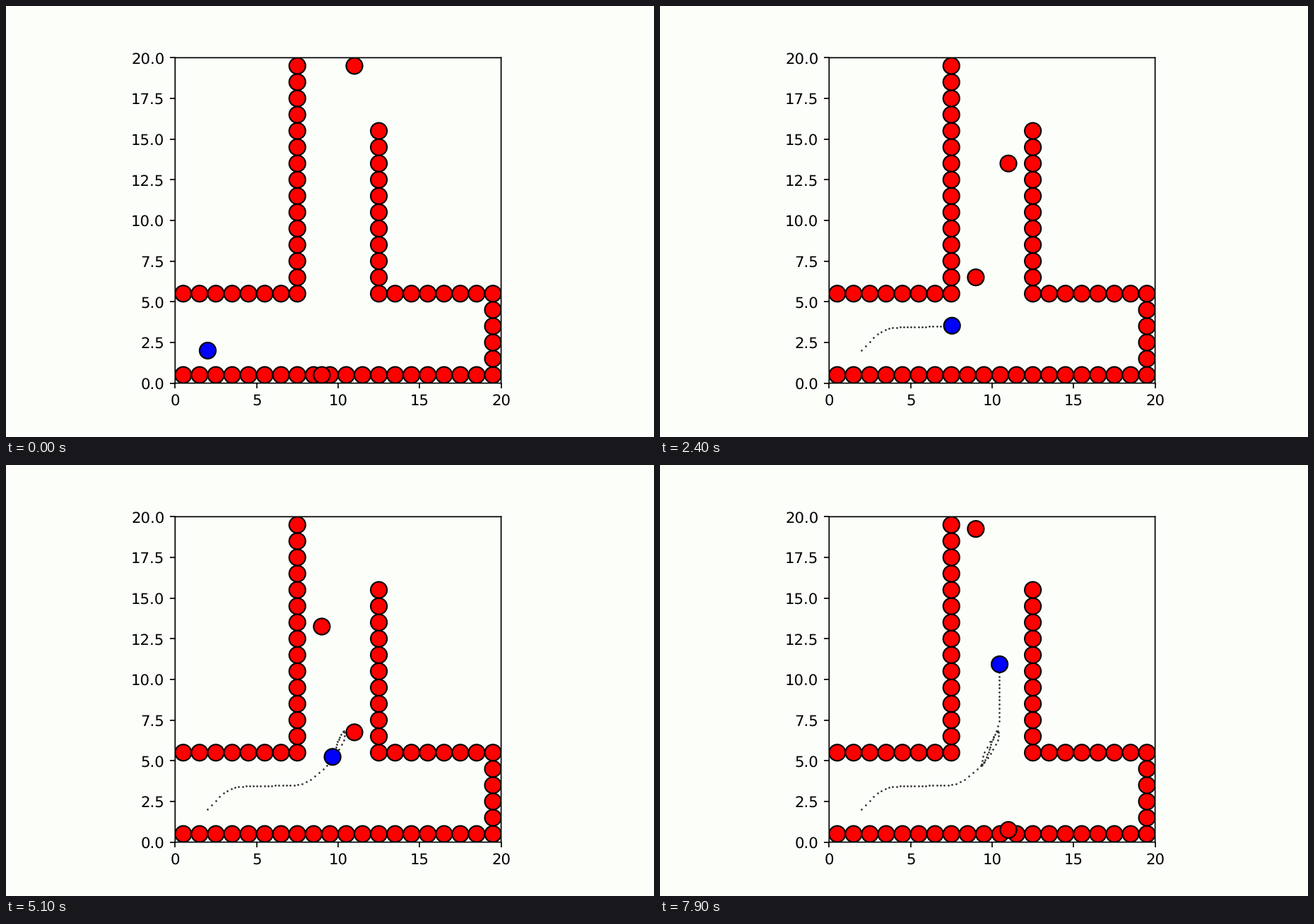
Write a matplotlib script that moves like this. It is 917 px wide and 611 px high and loops after 8000 ms.

```python
import matplotlib.pyplot as plt
import numpy as np
from matplotlib.animation import FuncAnimation
from matplotlib.patches import Circle

W, H, DPI = 917, 611, 128
U = 152.8 / DPI          # scale for point sizes
FRAMES, INTERVAL = 80, 100
PAPER, RED, BLUE = "#fcfefa", "#fe0000", "#0000fe"

# Robot's turning points: step, x, y
TURNS = np.array([
    (0, 2, 2), (4, 2.98, 3), (8, 3.9, 3.41), (24, 7.54, 3.53),
    (31, 9.32, 4.7), (35, 10.06, 5.71), (38, 10.4, 6.53), (40, 10.36, 6.85),
    (43, 10.09, 6.46), (51, 9.66, 5.24), (55, 9.36, 4.7), (58, 9.45, 5.29),
    (65, 10.42, 7.43), (79, 10.46, 10.93),
])


def glide(t, tk, p):
    """Cubic through the points p at times tk that never overshoots."""
    v = np.diff(p) / np.diff(tk)
    a, b = v[:-1], v[1:]
    same = a * b > 0
    mean = np.where(same, 2 * a * b / np.where(same, a + b, 1), 0)
    m = np.concatenate([v[:1], mean, v[-1:]])
    i = np.clip(np.searchsorted(tk, t, side="right") - 1, 0, len(tk) - 2)
    h = tk[i + 1] - tk[i]
    s = (t - tk[i]) / h
    return ((1 + 2 * s) * (1 - s) ** 2 * p[i] + s * (1 - s) ** 2 * h * m[i]
            + s * s * (3 - 2 * s) * p[i + 1] + s * s * (s - 1) * h * m[i + 1])


def travel(n, step=0.25, span=19.25):
    """Distance from the start of a body bouncing between two ends."""
    return span - abs(span - n * step)


steps = np.arange(FRAMES)
times, xs, ys = TURNS.T
path = np.column_stack([glide(steps, times, xs), glide(steps, times, ys)])

plt.rcParams.update({
    "font.family": "DejaVu Sans", "font.size": 10 * U,
    "text.hinting": "none", "path.snap": False,
    "axes.linewidth": 0.8 * U,
})

fig = plt.figure(figsize=(W / DPI, H / DPI), dpi=DPI, facecolor=PAPER)
ax = fig.add_axes([0.125, 0.125, 0.775, 0.755], facecolor=PAPER)
ax.set_aspect("equal")
ax.set(xlim=(0, 20), ylim=(0, 20))
ax.set_xticks(np.arange(0, 21, 5))
ax.set_yticks(np.arange(0, 20.1, 2.5))
ax.tick_params(length=3.5 * U, width=0.8 * U, pad=3.5 * U)


def disc(x, y, color, z=1):
    return ax.add_patch(Circle((x, y), 0.5, facecolor=color, edgecolor="black",
                               linewidth=U, zorder=z))


def wall(x, y):
    for cx, cy in np.broadcast(x, y):
        disc(cx, cy, RED)


wall(np.arange(0.5, 20), 0.5)
wall(np.arange(0.5, 8), 5.5)
wall(np.arange(12.5, 20), 5.5)
wall(7.5, np.arange(6.5, 20))
wall(12.5, np.arange(6.5, 16))
wall(19.5, np.arange(1.5, 5))

riser = disc(9, 0.5, RED, 1.2)
faller = disc(11, 19.5, RED, 1.2)
trail, = ax.plot([], [], "o", color="#2c2c2c", ms=2.7 * 72 / DPI, mew=0, zorder=1.4)
robot = disc(2, 2, BLUE, 1.6)


def draw(n):
    d = travel(n)
    riser.center = 9, 0.5 + d
    faller.center = 11, 19.5 - d
    trail.set_data(path[:n + 1, 0], path[:n + 1, 1])
    robot.center = tuple(path[n])
    return riser, faller, trail, robot


anim = FuncAnimation(fig, draw, frames=FRAMES, interval=INTERVAL,
                     repeat=True, repeat_delay=0)
plt.show()
```
